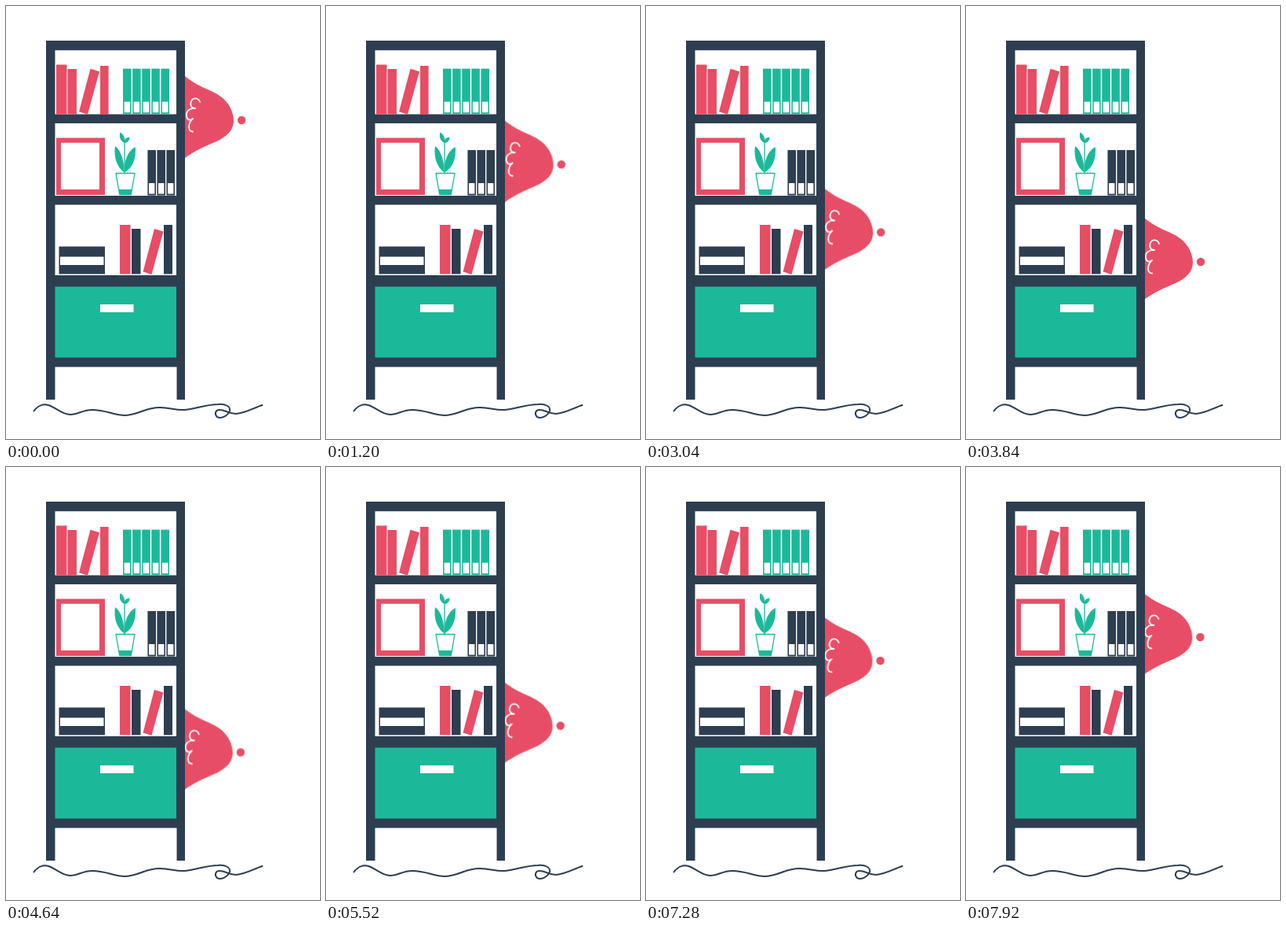
Recreate the animation shown at these times as an HTML page without scripts. Size 400 px wide and 550 px high, loop 8000 ms.

```html
<!DOCTYPE html>
<html lang="en">
<head>
<meta charset="utf-8">
<title>Behind the shelf</title>
<style>
  html, body { margin: 0; width: 100%; height: 100%; overflow: hidden; background: #fff; }
  svg { display: block; width: 400px; height: 550px; }
  .navy { fill: #2d3e51; }
  .red { fill: #e84d66; }
  .green { fill: #1bb999; }
  .white { fill: #fff; }
  .line { fill: none; stroke-linecap: round; stroke-linejoin: round; }
  .peek { animation: slide 8s linear infinite; }
  @keyframes slide {
    0%   { transform: translate(0, 0); }
    58%  { transform: translate(-1.3px, 217.4px); }
    59%  { transform: translate(-1.3px, 218.3px); }
    60%  { transform: translate(-1.3px, 217.4px); }
    100% { transform: translate(-1.7px, 67.3px); }
  }
</style>
</head>
<body>
<svg viewBox="0 0 400 550">
  <defs>
    <g id="binder">
      <path d="M0 0h10.6v57.6H0z"/>
      <path class="white" d="M1.6 42h7.4v13.6H1.6z"/>
    </g>
    <path id="leaning" d="M14.5 0L26 3.5 11 58 0 54.6z"/>
  </defs>

  <g class="peek">
    <path class="red" d="M210 78L228 89C246 104 262 106 275 116C285 124 290 136 290 146C290 158 281 166 268 172C252 179 240 184 228 193L210 205z"/>
    <circle class="red" cx="300.1" cy="145" r="5.2"/>
    <path class="line" stroke="#fff" stroke-width="1.8" d="M247 122C245 116 238 116 236 121C234 126 236 130 241 130C234 129 229 134 230 140C231 145 235 146 238 143C232 148 231 160 238 159.5"/>
  </g>

  <!-- shelf -->
  <path class="navy" d="M51 44h177v456H51z"/>
  <path class="white" d="M62.5 56.3h154.5v81.2H62.5zM62.5 149h154.5v92H62.5zM62.5 252.5h154.5v89.5H62.5zM62.5 458.5h155V501H62.5z"/>
  <path class="green" d="M62.5 356.5h154.5v90H62.5z"/>
  <path class="white" d="M120 379h42.5v10H120z"/>

  <!-- top row -->
  <g class="red">
    <path d="M64 74.5h13.5v63H64zM78.5 80H90v57.5H78.5zM120 76h10.6v62H120z"/>
    <use href="#leaning" x="93" y="79.7"/>
  </g>
  <g class="green">
    <use href="#binder" x="149" y="79.6"/>
    <use href="#binder" x="161.1" y="79.6"/>
    <use href="#binder" x="173.2" y="79.6"/>
    <use href="#binder" x="185.3" y="79.6"/>
    <use href="#binder" x="197.4" y="79.6"/>
  </g>

  <!-- middle row -->
  <path class="red" fill-rule="evenodd" d="M64 167.5h62V240H64zM70 173.8v59.2h49v-59.2z"/>
  <g class="green">
    <path d="M151 174C145 171 144 166 145.5 160.5C150 163 152 168 151 174zM151 174C150.500 169 153 167 157.500 166.500C157.500 171 155 173.500 151 174z"/>
    <path d="M150.500 211.500C141 204 137 192 139 178C147 184 151 198 150.500 211.500zM151 211.500C150 197 155 184 164.800 179C166 193 162 205 151 211.500z"/>
    <path d="M143.500 233h17l-1.300 7h-14.400z"/>
  </g>
  <path class="line" stroke="#1bb999" stroke-width="1.3" d="M151 172v40M140 212.500h24l-4.700 27h-14.600z"/>
  <g class="navy">
    <use href="#binder" x="180.400" y="183"/>
    <use href="#binder" x="192.400" y="183"/>
    <use href="#binder" x="204.400" y="183"/>
  </g>

  <!-- bottom row -->
  <path class="navy" d="M67.500 305.500H126v35H67.500zM160 283h11.500v57.500H160zM201 278h11v62.500h-11z"/>
  <path class="white" d="M69 318.500h55.500V329H69z"/>
  <g class="red">
    <path d="M145 278h13.600v62.500H145z"/>
    <use href="#leaning" x="174.500" y="283"/>
  </g>

  <!-- floor -->
  <path class="line" stroke="#2d3e51" stroke-width="2" d="M35.500 514.500C40 508 47 505 54 507C64 510 71 519 82 519C92 519 97 513 110 513C127 513 138 520 152 520C170 519 177 510 196 510C210 510 216 514 228 513C244 511 256 506 270 506C280 505 286 509 285 514C283 520 275 525 269 522C265 518 267 513 272 513C280 513 283 518 293 518C306 517 314 511 326.500 507"/>
</svg>
</body>
</html>
```
